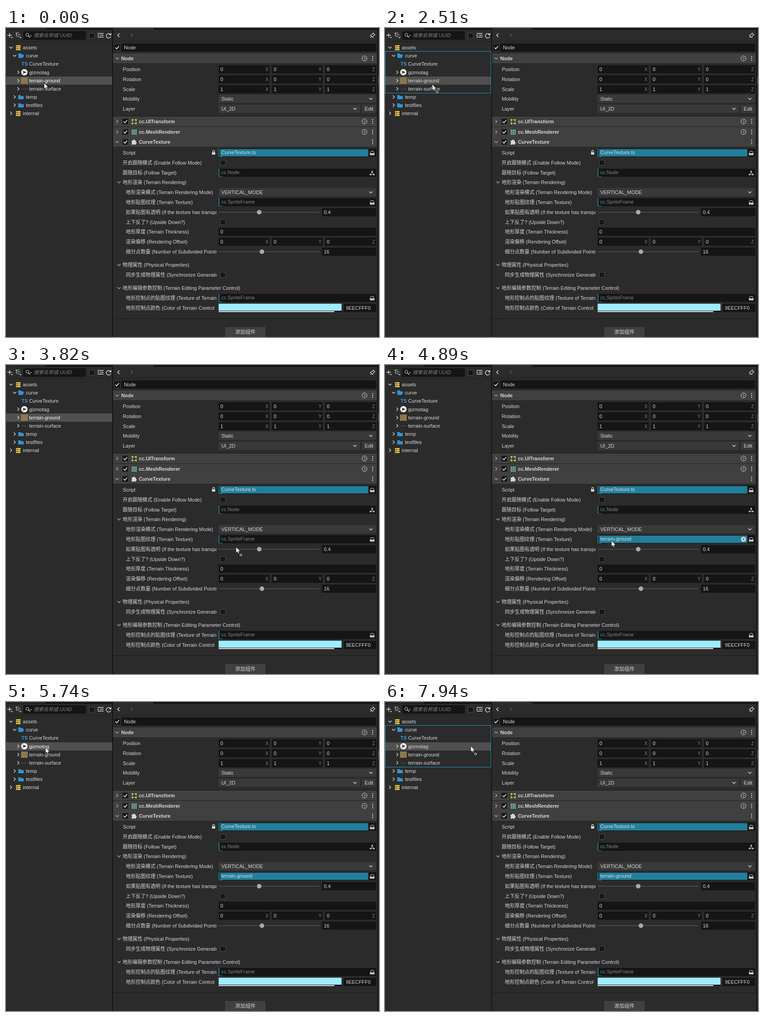
These frames come from a looping animation (822x681 px, 8000 ms). An HTML page with a canvas:

```html
<!DOCTYPE html>
<html lang="zh-CN">
<head>
<meta charset="utf-8">
<title>Terrain inspector</title>
<style>
  html, body { margin: 0; height: 100%; overflow: hidden; background: #2b2b2b; }
  canvas { display: block; }
</style>
</head>
<body>
<canvas id="stage" width="822" height="681"></canvas>
<script>
const ctx = document.getElementById('stage').getContext('2d');
const FONT = '"Liberation Sans", "Noto Sans CJK SC", "Noto Sans CJK", sans-serif';
const BG = '#2b2b2b', DARK = '#151515', HEAD = '#404040', SELECT = '#393939';
const TEAL = '#227f9b', TEXT = '#d8d8d8', DIM = '#838383', YELLOW = '#f2c94a', BLUE = '#2f94d6';
const LOOP = 8000;
const FIELD = 468.5;

// Cursor moves: start, end, number of steps, then [progress, x, y] waypoints.
const START = [84, 122];
const MOVES = [
  [190, 650, 9, [1, 91, 116]],
  [1080, 1860, 14, [.571, 102, 114], [1, 118, 129]],
  [1920, 2690, 14, [.35, 127, 122], [.786, 104, 125], [1, 115, 113]],
  [2750, 3520, 14, [.4, 250, 170], [1, 513, 298]],
  [3580, 4340, 13, [.308, 507, 402], [.55, 509, 408], [1, 501, 385]],
  [4400, 4401, 1, [1, 502, 389]],
  [4830, 4890, 2, [1, 499, 388]],
  [5140, 5740, 11, [.5, 290, 240], [.9, 95, 106], [1, 87, 101]],
  [6310, 7110, 14, [.4, 69, 95], [.75, 97, 97], [1, 93, 98]],
  [7240, 7590, 6, [1, 133, 105]],
  [7780, 7940, 4, [1, 189, 98]]
];

function cursorAt(time) {
  let [x, y] = START;
  for (const [start, end, steps, ...points] of MOVES) {
    if (time < start) break;
    const step = Math.floor((time - start) / (end - start) * (steps - 1) + .1) + 1;
    const progress = Math.min(1, step / steps);
    let from = 0;
    for (const [to, px, py] of points) {
      const k = Math.min(1, (progress - from) / (to - from));
      x += (px - x) * k;
      y += (py - y) * k;
      if (k < 1) break;
      from = to;
    }
  }
  return [Math.round(x), Math.round(y)];
}

function rect(x, y, w, h, color) {
  ctx.fillStyle = color;
  ctx.fillRect(x, y, w, h);
}

function frame(x, y, w, h, color) {
  ctx.strokeStyle = color;
  ctx.lineWidth = 1;
  ctx.strokeRect(x + .5, y + .5, w - 1, h - 1);
}

function path(data, x, y, { fill, stroke, width = 1.3 }) {
  const shape = new Path2D(data);
  ctx.save();
  ctx.translate(x, y);
  if (fill) { ctx.fillStyle = fill; ctx.fill(shape); }
  if (stroke) { ctx.strokeStyle = stroke; ctx.lineWidth = width; ctx.stroke(shape); }
  ctx.restore();
}

function circle(x, y, r, fill, stroke) {
  ctx.beginPath();
  ctx.arc(x, y, r, 0, Math.PI * 2);
  if (fill) { ctx.fillStyle = fill; ctx.fill(); }
  if (stroke) { ctx.strokeStyle = stroke; ctx.lineWidth = 1; ctx.stroke(); }
}

// y is the middle of the line; clip cuts the text at that x.
function text(string, x, y, { color = TEXT, style = '', align = 'left', size = 10.9, clip } = {}) {
  ctx.save();
  if (clip) {
    ctx.beginPath();
    ctx.rect(0, 0, clip, 681);
    ctx.clip();
  }
  ctx.font = `${style} ${size}px ${FONT}`;
  ctx.textAlign = align;
  ctx.fillStyle = color;
  ctx.fillText(string, x, y + 4);
  ctx.restore();
}

const chevronDown = (x, y, color = TEXT, s = 3.5) =>
  path(`M${-s} ${-s / 2}L0 ${s / 2}L${s} ${-s / 2}`, x, y, { stroke: color });
const chevronRight = (x, y, color = TEXT, s = 3.5) =>
  path(`M${-s / 2} ${-s}L${s / 2} 0L${-s / 2} ${s}`, x, y, { stroke: color });

function checkbox(x, y, checked) {
  rect(x - 6, y - 6, 12, 12, DARK);
  frame(x - 6, y - 6, 12, 12, checked ? '#111111' : '#484848');
  if (checked) path('M-4 0L-1 3L4 -3', x, y, { stroke: '#eeeeee', width: 1.6 });
}

function input(x, y, right, value, suffix) {
  rect(x, y - 9, right - x, 18, DARK);
  text(value, x + 4, y);
  if (suffix) text(suffix, right - 6, y, { color: DIM, align: 'center', size: 10 });
}

function dropdown(y, right, value) {
  rect(FIELD, y - 9, right - FIELD, 18, SELECT);
  text(value, 474.5, y);
  chevronDown(right - 11, y);
}

function vector(y, value) {
  input(FIELD, y, 581, value, 'X');
  input(586, y, 698, value, 'Y');
  input(703, y, 816, value, 'Z');
}

function slider(y, knob, value) {
  rect(FIELD, y - 1, 222, 2, '#484848');
  circle(knob, y, 5, '#aaaaaa');
  input(696.5, y, 816, value);
}

function assetField(y, value, filled, nodeIcon) {
  rect(FIELD, y - 9, 816 - FIELD, 18, DARK);
  rect(FIELD, y - 9, 2, 18, TEAL);
  rect(471, y + 8, 6, 1, TEAL);
  if (filled) rect(472, y - 8, 326.5, 16, TEAL);
  text(value, 474.5, y - 1, { color: filled ? '#dddddd' : DIM });
  if (nodeIcon) {
    path('M0 -3L-3 3H3Z', 807, y + 1, { stroke: TEXT, width: 1 });
    for (const [dx, dy] of [[0, -3], [-4, 4], [4, 4]]) circle(807 + dx, y + dy, 1.6, TEXT);
  } else {
    path('M-4.5 1L-2.5 -3.5H2.5L4.5 1V5H-4.5Z', 807, y, { stroke: TEXT, width: 1 });
    rect(803, y + 1, 9, 3, TEXT);
  }
}

function section(y, height, title, open, extras) {
  rect(236, y - 11, 581, height, HEAD);
  rect(236, y + height - 11, 581, 1, '#222222');
  (open ? chevronDown : chevronRight)(245, y, '#aaaaaa');
  if (extras.check) checkbox(263, y, true);
  text(title, extras.check ? 293 : 254, y, { style: 'bold' });
  if (extras.help) {
    circle(790, y, 5.5, null, TEXT);
    text('?', 790, y, { align: 'center', size: 9 });
  }
  for (const dy of [-4, 0, 4]) rect(807, y + dy - 1, 2, 2, TEXT);
}

function label(string, x, y) {
  text(string, x, y, { clip: 464 });
}

function group(string, y) {
  chevronDown(249, y, '#aaaaaa');
  text(string, 257, y);
}

function database(x, y) {
  for (const dy of [-5, -1, 3]) {
    rect(x - 5, y + dy, 10, 3, YELLOW);
    rect(x - 3, y + dy + 1, 2, 1, '#6b5719');
  }
}

const folder = (x, y) => path('M-6 -4H-1L1 -2H6V5H-6Z', x, y, { fill: BLUE });

function drawToolbar() {
  rect(0, 0, 822, 4, '#141414');
  rect(0, 0, 87, 3, BG);
  rect(236, 0, 89, 4, BG);
  path('M-5 0H5M0 -5V5', 8, 16, { stroke: TEXT });
  path('M0 0H4L2 3Z', 11, 20, { fill: TEXT });
  path('M-6 -5H2M-2 -1H5M-2 3H3M-4 -5V3', 27, 16, { stroke: TEXT, width: 1.2 });
  path('M0 0H4L2 3Z', 30, 20, { fill: TEXT });
  rect(38, 7, 138, 19, DARK);
  circle(47, 15, 3.3, null, TEXT);
  path('M0 0L4 4', 49, 17, { stroke: TEXT, width: 1.6 });
  path('M0 0H4L2 2Z', 53, 16, { fill: TEXT });
  text('搜索名称或 UUID', 61, 16, { color: DIM, style: 'italic' });
  checkbox(189, 17, false);
  path('M-6 -4H7M-1 0H7M-6 4H7', 208, 16, { stroke: TEXT });
  path('M-6 -2L-3 0L-6 2Z', 208, 16, { fill: TEXT });
  path('M4 -3A5 5 0 1 0 4.8 2', 226, 17, { stroke: TEXT, width: 1.5 });
  path('M6 -6V-1H1Z', 226, 17, { fill: TEXT });
  rect(0, 29, 234, 1, '#202020');
}

function drawTree(selected, dragging) {
  if (selected) rect(0, selected === 'gizmotag' ? 89 : 107, 234, 18, '#505050');
  const item = (name, x, y) =>
    text(name, x, y, { color: name === selected && !dragging ? '#ffffff' : TEXT });
  chevronDown(11, 43);
  database(27, 43);
  item('assets', 37, 43);
  chevronDown(19, 61);
  path('M-6 -5H-1L1 -3H5V-1H-3L-6 4Z', 33, 61, { fill: BLUE });
  path('M-3 -1H7L4 5H-6Z', 33, 61, { fill: BLUE });
  item('curve', 44, 61);
  text('TS', 34, 79, { color: '#35a0e4', style: 'bold' });
  item('CurveTexture', 51, 79);
  for (const y of [97.5, 116, 134]) chevronRight(27, y);
  circle(40.5, 97.5, 7, '#f4f4f4');
  path('M-4 -3.5L5 0L-4 3.5L-2 0Z', 40.5, 97.5, { fill: '#333333' });
  item('gizmotag', 51, 98);
  rect(33, 109, 15, 14, '#8b7449');
  for (const y of [112, 116, 120]) rect(33, y, 15, 1, '#968054');
  item('terrain-ground', 51, 116);
  rect(34, 134, 14, 1, '#55534c');
  item('terrain-surface', 51, 134);
  for (const [name, y] of [['temp', 152], ['testfiles', 170]]) {
    chevronRight(19, y);
    folder(33, y);
    item(name, 44, y);
  }
  chevronRight(11, 188);
  database(27, 188);
  item('internal', 37, 188);
  if (dragging) frame(0, 51, 234, 93, '#2398b4');
}

function drawInspector(assigned, clearable, dropTarget) {
  rect(234, 0, 2, 681, '#141414');
  rect(818, 0, 2, 681, '#141414');
  rect(820, 107, 2, 18, '#505050');
  rect(236, 29, 582, 1, '#202020');
  path('M2 -4L-2 0L2 4', 248, 16, { stroke: TEXT, width: 1.6 });
  chevronRight(277, 16, '#5c5c5c', 4);
  path('M1 -5L5 -1L3 0L1 3L0 5L-5 0L-3 -1L0 -3ZM-2 2L-5 5', 808, 16, { stroke: TEXT });
  checkbox(245, 43, true);
  input(254, 43, 816, '');
  text('Node', 260, 43);

  section(67, 22, 'Node', true, { help: true });
  ['Position', 'Rotation', 'Scale', 'Mobility', 'Layer']
    .forEach((name, i) => label(name, 257.5, [91, 113, 135, 156, 178][i]));
  vector(91, '0');
  vector(113, '0');
  vector(135, '1');
  dropdown(156, 815, 'Static');
  dropdown(178, 780, 'UI_2D');
  rect(784, 169, 31, 18, SELECT);
  text('Edit', 800, 178, { align: 'center' });
  rect(236, 194, 581, 1, '#1c1c1c');

  section(206, 22, 'cc.UITransform', false, { check: true, help: true });
  frame(278, 202, 9, 9, '#b9c24a');
  for (const x of [277, 285]) for (const y of [201, 209]) rect(x, y, 3, 3, '#d3d84f');
  section(229, 22, 'cc.MeshRenderer', false, { check: true, help: true });
  for (const x of [277, 281, 285]) for (const y of [224, 228, 232]) rect(x, y, 3, 3, '#6fc795');
  section(251, 22, 'CurveTexture', true, { check: true });
  path('M-5 -3H-2A2 2 0 1 1 2 -3H4V0A2 2 0 1 1 4 4V6H1A2 2 0 0 0 -2 6H-5V3A2 2 0 0 0 -5 0Z',
    282, 251, { fill: TEXT });

  label('Script', 257.5, 275);
  rect(454, 274, 7, 5, TEXT);
  path('M-2 0V-2A2 2 0 0 1 2 -2V0', 457.5, 274, { stroke: TEXT });
  assetField(275, 'CurveTexture.ts', true);
  label('开启跟随模式 (Enable Follow Mode)', 257, 297);
  checkbox(478, 297, false);
  label('跟随目标 (Follow Target)', 257, 319);
  assetField(319, 'cc.Node', false, true);

  group('地形渲染 (Terrain Rendering)', 340);
  label('地形渲染模式 (Terrain Rendering Mode)', 264, 362);
  dropdown(362, 815, 'VERTICAL_MODE');
  label('地形贴图纹理 (Terrain Texture)', 264, 384);
  assetField(384, assigned ? 'terrain-ground' : 'cc.SpriteFrame', assigned);
  if (clearable) {
    circle(790, 384, 5.5, '#dddddd');
    path('M-2 -2L2 2M2 -2L-2 2', 790, 384, { stroke: TEAL });
  }
  if (dropTarget) frame(468, 375, 348, 18, TEAL);
  label('如果贴图有透明 (If the texture has transparency)', 264, 406);
  slider(406, 558, '0.4');
  label('上下反了? (Upside Down?)', 264, 428);
  checkbox(478, 428, false);
  label('地形厚度 (Terrain Thickness)', 264, 449);
  input(FIELD, 449, 816, '0');
  label('渲染偏移 (Rendering Offset)', 264, 471);
  vector(471, '0');
  label('细分点数量 (Number of Subdivided Points)', 264, 493);
  slider(493, 564, '16');

  group('物理属性 (Physical Properties)', 522);
  label('同步生成物理属性 (Synchronize Generation)', 264, 544);
  checkbox(478, 544, false);

  group('地形编辑参数控制 (Terrain Editing Parameter Control)', 573);
  label('地形控制点的贴图纹理 (Texture of Terrain Control)', 264, 595);
  assetField(595, 'cc.SpriteFrame', false);
  label('地形控制点颜色 (Color of Terrain Control', 264, 617);
  rect(468, 607, 272, 19, DARK);
  rect(FIELD, 607.5, 271, 15.5, '#9eecff');
  rect(FIELD, 624, 255, 2, '#f2f2f2');
  input(744, 617, 816, '');
  text('9EECFFF0', 749, 617);
  rect(236, 640, 582, 1, '#181818');
  rect(483, 659, 89, 22, HEAD);
  text('添加组件', 527.5, 670, { align: 'center', size: 11.2 });
}

function drawCursor(x, y, badge) {
  path('M0 -1V12L3 9.5L5 14L7 13L5.2 8.8H9.4Z', x, y,
    { fill: '#ffffff', stroke: '#111111', width: .8 });
  if (badge) {
    rect(x + 7, y + 13, 6, 7, '#111111');
    frame(x + 8, y + 14, 5, 5, '#dddddd');
    rect(x + 10, y + 16, 1, 1, '#ffffff');
  }
}

function render(time) {
  const [x, y] = cursorAt(time);
  const dragging = (time >= 1200 && time < 4830) || time >= 7300;
  const assigned = time >= 4830;
  const overTree = x < 234;
  const overTexture = x > 468 && y >= 375 && y < 393;
  const selected = time < 4830 ? 'terrain-ground' : time >= 5690 ? 'gizmotag' : '';

  rect(0, 0, 822, 681, BG);
  drawToolbar();
  drawTree(selected, dragging && overTree);
  drawInspector(assigned, assigned && overTexture, dragging && overTexture);
  drawCursor(x, y, dragging);
}

const begin = performance.now();
function tick() {
  render((performance.now() - begin) % LOOP);
  requestAnimationFrame(tick);
}
tick();
</script>
</body>
</html>
```
